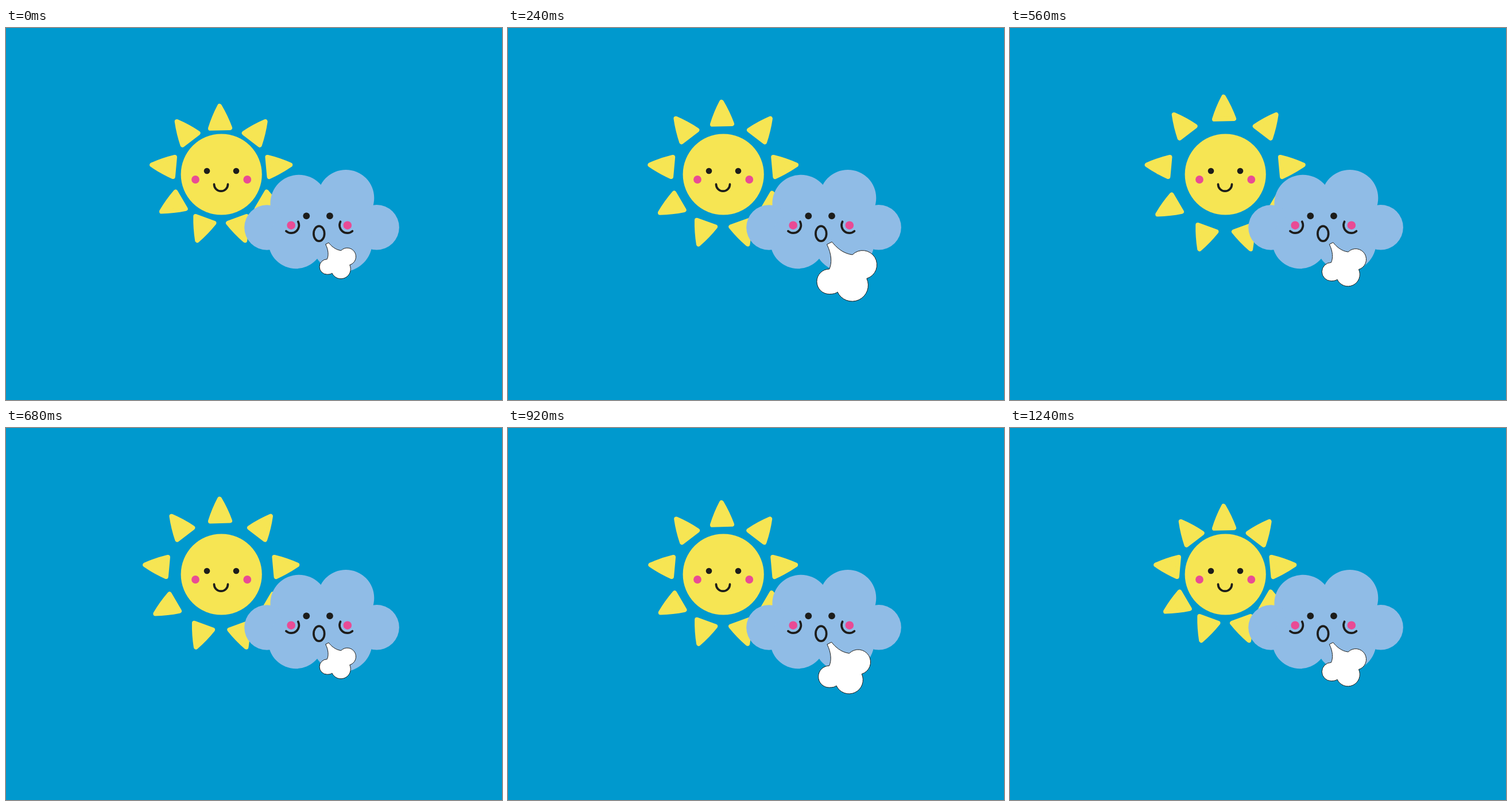
Write an HTML page that moves like this. It is 864 px wide and 648 px high and loops after 1.36 s.

```html
<!DOCTYPE html>
<html lang="en">
<head>
<meta charset="utf-8">
<title>Sun and cloud</title>
<style>
  html, body { margin: 0; width: 100%; height: 100%; overflow: hidden; background: #0099ce; }
  svg { display: block; width: 100vw; height: 100vh; }
  .sun { fill: #f6e553; }
  #rays path { stroke: #f6e553; stroke-width: 8; stroke-linejoin: round; }
  .cloud { fill: #90bce6; }
  .ink { fill: #1d1d1b; }
  .pink { fill: #e94b95; }
  .line { fill: none; stroke: #1d1d1b; stroke-width: 3.7; stroke-linecap: round; }
  #puff { fill: #fff; stroke: #1d1d1b; stroke-width: 1; vector-effect: non-scaling-stroke; }
</style>
</head>
<body>
<svg viewBox="0 0 864 648">
  <g id="rays" class="sun"></g>
  <circle class="sun" cx="375.2" cy="255" r="70.6"/>
  <g class="ink">
    <circle cx="350" cy="249" r="5.3"/>
    <circle cx="401" cy="249" r="5.3"/>
  </g>
  <g class="pink">
    <circle cx="330" cy="264" r="6.9"/>
    <circle cx="420.3" cy="264" r="6.9"/>
  </g>
  <path class="line" d="M362.5 272.2A12 12 0 0 0 386.5 272.2"/>

  <g class="cloud">
    <circle cx="510.4" cy="305.7" r="50"/>
    <circle cx="592" cy="296.2" r="49.3"/>
    <circle cx="454.5" cy="347.5" r="39.3"/>
    <circle cx="645.7" cy="347.3" r="39.2"/>
    <circle cx="505" cy="371" r="48.2"/>
    <circle cx="585.5" cy="372" r="52.7"/>
    <rect x="480" y="300" width="145" height="90"/>
  </g>
  <g class="ink">
    <circle cx="523.3" cy="327.3" r="5.9"/>
    <circle cx="564" cy="327.3" r="5.9"/>
  </g>
  <g class="pink">
    <circle cx="496.7" cy="343.7" r="7.3"/>
    <circle cx="594.8" cy="343.7" r="7.3"/>
  </g>
  <ellipse class="line" cx="545.3" cy="358.2" rx="9.4" ry="13"/>
  <path id="crease" class="line" d="M508.8 337.3A13.5 13.5 0 0 1 488 353.8"/>
  <use href="#crease" transform="matrix(-1 0 0 1 1091.4 0)"/>

  <path id="puff" d="M555.5 377L564.3 372.5C571 381 583 393 600 395A25 25 0 1 1 625 436.5A28 28 0 0 1 574 460Q570.5 463.7 559.7 463.7A21.8 21.8 0 0 1 559.7 420C564.5 410 564 394 555.5 377Z"/>
</svg>
<script>
const loop = 1360;
const starts = [0, 120, 240, 360, 440, 560, 680, 800, 920, 1040, 1160, 1240];
const peak = 5;
const last = starts.length - 1;
const half = starts.length / 2;

const rayShape = 'M0 0Q10.3 18.4 17.1 38.4H-17.1Q-10.3 18.4 0 0Z';
const mirror = ray => ({ x: 749.4 - ray.x, y: ray.y, turn: -ray.turn, dx: -ray.dx, dy: ray.dy });

// Tip, tilt and farthest shift of the rays on the left; the right side mirrors them.
const leftRays = [
  { x: 297.7, y: 163, turn: -37.5, dx: -12, dy: -12 },
  { x: 254.2, y: 238.5, turn: -84.8, dx: -15.5, dy: 0 },
  { x: 271, y: 319.6, turn: -120.4, dx: -13.8, dy: 5 },
  { x: 333.2, y: 370, turn: -160, dx: -3, dy: 15 }
];
const topRay = { x: 372, y: 136, turn: -1.5, dx: 0, dy: -16 };
const rays = [topRay, ...leftRays, ...leftRays.map(mirror)];

for (const ray of rays) {
  ray.path = document.createElementNS('http://www.w3.org/2000/svg', 'path');
  ray.path.setAttribute('d', rayShape);
  document.getElementById('rays').append(ray.path);
}
const puff = document.getElementById('puff');

// Rays glide out to the peak, then ease back to rest.
function spread(step) {
  return step <= peak
    ? (step / peak) ** .9
    : ((last - step) / (last - peak)) ** 1.4;
}

// Two puffs per loop; the first swells faster and stays full for longer.
function puffSize(step) {
  const rise = step < half ? 1.5 : 1;
  const i = step % half;
  return .605 + .131 * Math.min(3, rise * i, half - i);
}

function draw(time) {
  const t = time % loop;
  const step = starts.filter(s => s <= t).length - 1;
  const out = spread(step);
  for (const { path, x, y, turn, dx, dy } of rays) {
    path.setAttribute('transform',
      `translate(${x + out * dx} ${y + out * dy}) rotate(${turn})`);
  }
  puff.setAttribute('transform',
    `translate(558.6 376.3) scale(${puffSize(step)}) translate(-558.6 -376.3)`);
}

let origin;
function tick(now) {
  origin ??= now;
  draw(now - origin);
  requestAnimationFrame(tick);
}
draw(0);
requestAnimationFrame(tick);
</script>
</body>
</html>
```
